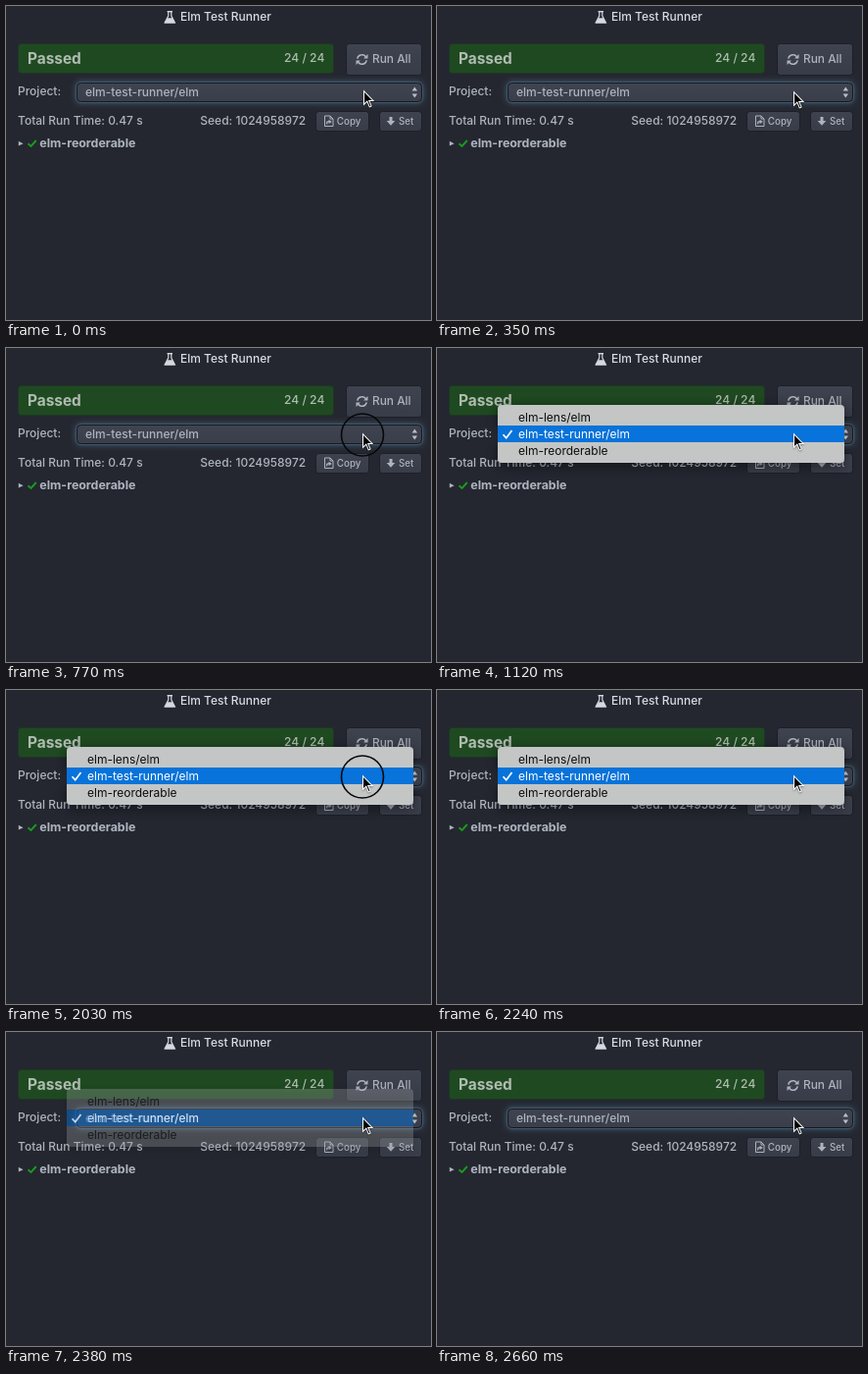
An HTML page with a canvas for the animation above (3.5 s loop, 434 px wide and 320 px high).

```html
<!DOCTYPE html>
<html lang="en">
<head>
<meta charset="utf-8">
<title>Elm Test Runner</title>
<style>
  html, body { margin: 0; width: 100%; height: 100%; overflow: hidden; background: #242730; }
  canvas { display: block; width: 434px; height: 320px; }
</style>
</head>
<body>
<canvas id="stage"></canvas>
<script>
const W = 434, H = 320, LOOP = 3500, STEP = 70;
const canvas = document.getElementById('stage');
const ctx = canvas.getContext('2d');
const dpr = window.devicePixelRatio || 1;
canvas.width = W * dpr;
canvas.height = H * dpr;

const TEXT = '#aeb4be';
const PROJECTS = ['elm-lens/elm', 'elm-test-runner/elm', 'elm-reorderable'];

function text(str, x, y, color = TEXT, size = 12, weight = 500) {
  ctx.font = `${weight} ${size}px Inter, "Liberation Sans", sans-serif`;
  ctx.fillStyle = color;
  ctx.fillText(str, x, y);
}

function box(x, y, w, h, r, fill, stroke) {
  ctx.beginPath();
  ctx.roundRect(x, y, w, h, r);
  if (fill) { ctx.fillStyle = fill; ctx.fill(); }
  if (stroke) { ctx.strokeStyle = stroke; ctx.lineWidth = 1; ctx.stroke(); }
}

function trace(points, closed) {
  ctx.beginPath();
  points.forEach(([x, y]) => ctx.lineTo(x, y));
  if (closed) ctx.closePath();
}

function shape(points, color) {
  trace(points, true);
  ctx.fillStyle = color;
  ctx.fill();
}

function line(points, color, width) {
  trace(points, false);
  ctx.strokeStyle = color;
  ctx.lineWidth = width;
  ctx.stroke();
}

function vertical(y, h, top, bottom) {
  const g = ctx.createLinearGradient(0, y, 0, y + h);
  g.addColorStop(0, top);
  g.addColorStop(1, bottom);
  return g;
}

function button(x, y, w, h) {
  box(x + .5, y + .5, w - 1, h - 1, 3, vertical(y, h, '#3e434f', '#383c48'), '#1c1f26');
}

function check(x, y, w, h, color, width) {
  line([[x, y + h * .55], [x + w * .36, y + h], [x + w, y]], color, width);
}

function flask(x, y) {
  const c = '#d5d8de';
  line([[x + 2.8, y + .7], [x + 8.2, y + .7]], c, 1.4);
  line([[x + 4, y + 1], [x + 4, y + 5], [x + .4, y + 12], [x + 10.6, y + 12],
        [x + 7, y + 5], [x + 7, y + 1]], c, 1.2);
  shape([[x + 3, y + 7.3], [x + 8, y + 7.3], [x + 11, y + 12.6], [x, y + 12.6]], c);
}

function syncIcon(cx, cy) {
  ctx.save();
  ctx.translate(cx, cy);
  for (let i = 0; i < 2; i++) {
    ctx.beginPath();
    ctx.arc(0, 0, 4.8, Math.PI * 1.06, Math.PI * 1.8);
    ctx.strokeStyle = TEXT;
    ctx.lineWidth = 1.6;
    ctx.stroke();
    shape([[6, -5.6], [6, -1], [1.6, -1]], TEXT);
    ctx.rotate(Math.PI);
  }
  ctx.restore();
}

function copyIcon(x, y) {
  line([[x + 6, y + .5], [x + .5, y + .5], [x + .5, y + 11], [x + 9, y + 11],
        [x + 9, y + 3.5], [x + 6, y + .5], [x + 6, y + 3.5], [x + 9, y + 3.5]], TEXT, 1);
  line([[x + 2.6, y + 9], [x + 2.8, y + 6.8], [x + 5, y + 6.2]], TEXT, 1.2);
  shape([[x + 4.6, y + 4.2], [x + 7.8, y + 6.4], [x + 4.6, y + 8.6]], TEXT);
}

function selectField() {
  const x = 72, y = 78, w = 353, h = 20;
  ctx.save();
  ctx.shadowColor = 'rgba(86, 130, 165, .8)';
  ctx.shadowBlur = 6 * dpr;
  box(x, y, w, h, 4, '#3a3f4b');
  ctx.restore();
  box(x + .5, y + .5, w - 1, h - 1, 4, vertical(y, h, '#3f4450', '#393e4a'), '#161a21');
  box(x - .5, y - .5, w + 1, h + 1, 4.5, null, 'rgba(82, 115, 142, .35)');
  text(PROJECTS[1], 81, 92);
  shape([[417.3, 82.5], [420, 86.5], [414.6, 86.5]], '#b9bec8');
  shape([[417.3, 93.5], [420, 89.5], [414.6, 89.5]], '#b9bec8');
}

function page() {
  ctx.fillStyle = '#242730';
  ctx.fillRect(0, 0, W, H);

  flask(161.8, 5);
  text('Elm Test Runner', 178, 15.3, '#d9dce2');

  box(12.5, 38.5, 322, 30, 3, '#1f4a21', '#1d3624');
  text('Passed', 22, 59.3, '#b0bcb1', 15.4, 700);
  text('24 / 24', 284, 57.3, '#b0bcb1', 12.1);

  button(347, 38, 78, 33);
  syncIcon(363.5, 54.5);
  text('Run All', 374, 58.3, TEXT, 11.9);

  text('Project:', 12, 91.3);
  selectField();

  text('Total Run Time: 0.47 s', 12, 121.3);
  text('Seed: 1024958972', 198.3, 121.3);
  button(316, 107, 55, 21);
  copyIcon(325, 111.5);
  text('Copy', 337.8, 121.2, TEXT, 9.8);
  button(381, 107, 44, 21);
  shape([[391.5, 113], [394.5, 113], [394.5, 117], [397.3, 117], [393, 121.8],
         [388.7, 117], [391.5, 117]], TEXT);
  text('Set', 401, 121.2, TEXT, 9.7);

  shape([[12.8, 137.8], [17.6, 140.2], [12.8, 142.6]], TEXT);
  check(22.5, 137, 8.3, 6, '#1b9a1f', 1.9);
  text('elm-reorderable', 34.3, 144.2, TEXT, 12.4, 700);
}

// The panel fades fastest, then the highlight, then the labels.
function menu(fade, lit) {
  const left = 62, top = 58, w = 354, h = 59, rowTop = 79, rowH = 17;
  const ink = i => lit && i === 1 ? '#fff' : '#0c0c0c';
  ctx.save();
  ctx.globalAlpha = (1 - fade) ** 2;
  ctx.shadowColor = 'rgba(0, 0, 0, .5)';
  ctx.shadowBlur = 14 * dpr;
  ctx.shadowOffsetY = 3 * dpr;
  ctx.beginPath();
  ctx.roundRect(left, top, w, h, 4);
  if (lit) ctx.rect(left, rowTop, w, rowH);
  ctx.fillStyle = '#c3c6c5';
  ctx.fill('evenodd');
  ctx.shadowColor = 'transparent';
  if (lit) {
    ctx.globalAlpha = 1 - fade;
    ctx.fillStyle = '#0873da';
    ctx.fillRect(left, rowTop, w, rowH);
  }
  ctx.globalAlpha = 1 - fade ** 2;
  PROJECTS.forEach((name, i) => text(name, 83, 75 + 17 * i, ink(i), 12, 400));
  check(67.5, 84, 9, 7.7, ink(1), 1.7);
  ctx.restore();
}

function clickRing(x, y) {
  ctx.beginPath();
  ctx.arc(x, y, 21.5, 0, Math.PI * 2);
  ctx.strokeStyle = '#05070a';
  ctx.lineWidth = 1.6;
  ctx.stroke();
}

function pointer(x, y) {
  ctx.save();
  ctx.translate(x, y);
  ctx.shadowColor = 'rgba(0, 0, 0, .4)';
  ctx.shadowBlur = 2 * dpr;
  ctx.shadowOffsetY = dpr;
  shape([[0, 0], [0, 16], [3.7, 12.6], [6, 18], [8.7, 16.8], [6.5, 11.5], [11.2, 11.5]], '#fff');
  ctx.shadowColor = 'transparent';
  shape([[1, 2.4], [1, 13.6], [4, 10.8], [6.5, 16.7], [7.5, 16.2], [5, 10.5], [8.9, 10.5]], '#000');
  ctx.restore();
}

const within = (t, from, to) => t >= from && t < to;

function draw(now) {
  const t = Math.floor(now % LOOP / STEP) * STEP;
  ctx.setTransform(dpr, 0, 0, dpr, 0, 0);
  page();

  if (within(t, 840, 2520)) {
    const fade = Math.max(0, (t - 2240) / 280);
    menu(fade, !within(t, 2170, 2240));
  }
  if (within(t, 770, 910) || within(t, 2030, 2170)) clickRing(364, 88.5);

  const drift = Math.min(1, t / 350);
  pointer(365 - drift, 85.5 + drift);
  requestAnimationFrame(draw);
}

requestAnimationFrame(draw);
</script>
</body>
</html>
```
